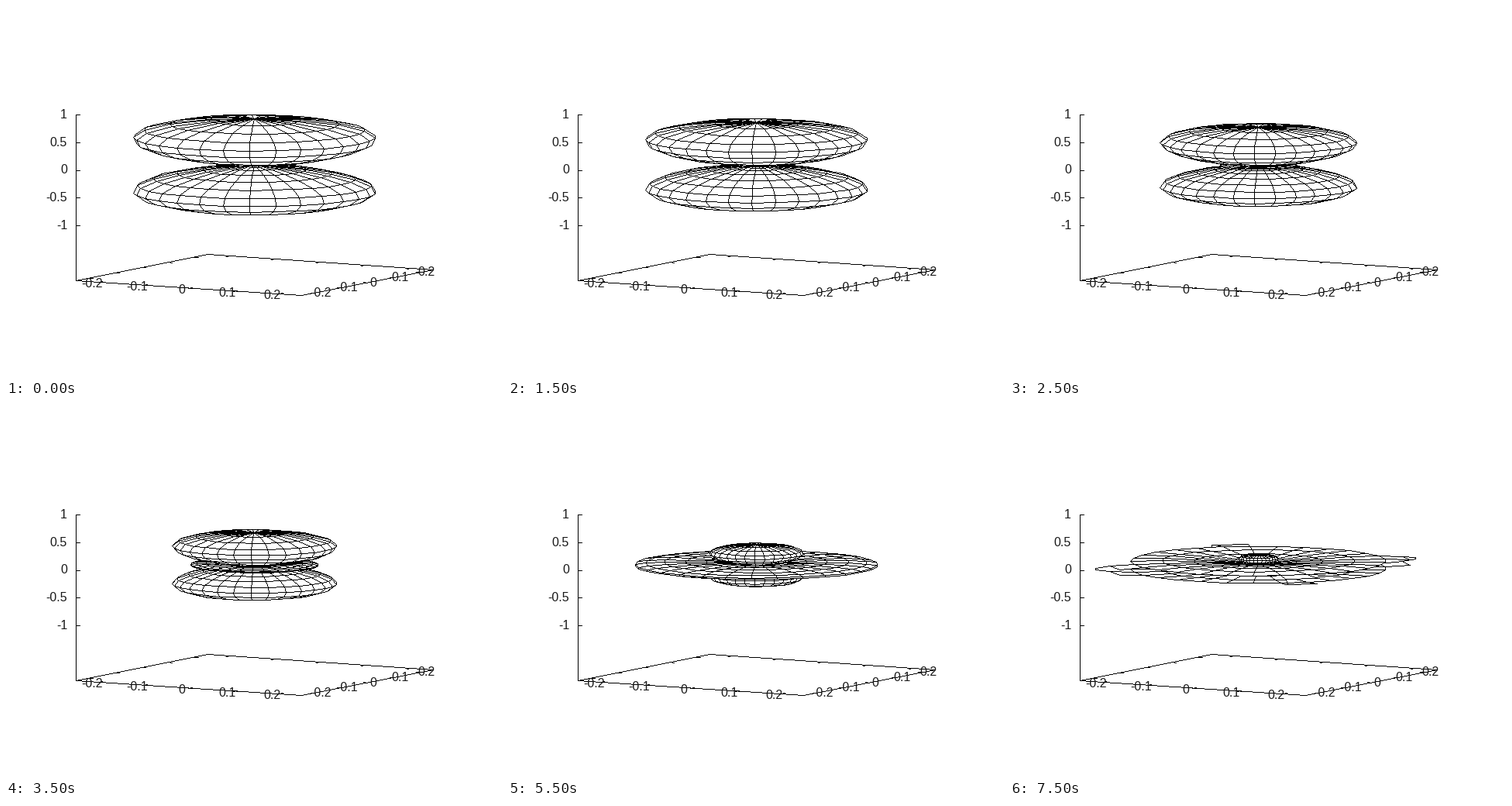
A matplotlib script that plays this animation: 640x480 px, repeating every 8000 ms.

```python
import numpy as np
import matplotlib.pyplot as plt
from matplotlib.animation import FuncAnimation

W, H, DPI = 640, 480, 100
FRAMES, STEP = 16, 500
SEG = 29                            # mesh cells along each angle
LIM = 0.25                          # x and y range is -LIM..LIM

CENTER = np.array([320.2, 204.5])
EX = np.array([582.0, 39.0])        # pixels per unit along x, y and z
EY = np.array([340.0, -67.0])
EZ = np.array([0.0, -71.2])


def project(x, y, z):
    x, y, z = (np.asarray(v, float)[..., None] for v in (x, y, z))
    return CENTER + x * EX + y * EY + z * EZ


# Superposition of the spherical harmonics Y00 and Y20
theta, azim = np.meshgrid(np.linspace(0, np.pi, SEG + 1),
                          np.linspace(0, 2 * np.pi, SEG + 1), indexing="ij")
Y00 = np.sqrt(1 / (4 * np.pi))
Y20 = np.sqrt(5 / (16 * np.pi)) * (3 * np.cos(theta) ** 2 - 1)


def surface(phase):
    r = Y00 ** 2 + Y20 ** 2 + 2 * Y00 * Y20 * np.cos(phase)
    rho = r * np.sin(theta)
    return rho * np.cos(azim), rho * np.sin(azim), r * np.cos(theta)


def corners(a):
    return np.stack([a[:-1, :-1], a[1:, :-1], a[1:, 1:], a[:-1, 1:]], axis=2)


def loose_edges(inside, whole):
    """Edges in range that belong to no complete cell."""
    found = []
    for i in range(SEG + 1):
        for j in range(SEG):
            if not inside[i, j]:
                continue
            near = [whole[k, j] for k in (i - 1, i) if 0 <= k < SEG]
            if inside[i, j + 1] and not any(near):
                found.append(((i, j), (i, j + 1)))
            if i < SEG and inside[i + 1, j] and not (whole[i, j] or whole[i, j - 1]):
                found.append(((i, j), (i + 1, j)))
    return found


def cells(phase):
    """Screen polygons of the mesh, farthest first."""
    x, y, z = surface(phase)
    pts = project(x, y, z)
    depth = 0.5 * x - 0.866 * y + 0.0125 * z
    inside = (abs(x) <= LIM) & (abs(y) <= LIM)
    whole = corners(inside).all(axis=2)

    quads = corners(pts)[whole]
    key = corners(depth).mean(axis=2)[whole]
    d1, d2 = quads[:, 2] - quads[:, 0], quads[:, 3] - quads[:, 1]
    front = d1[:, 0] * d2[:, 1] - d1[:, 1] * d2[:, 0] < 0

    edges = loose_edges(inside, whole)
    if edges:
        lines = np.array([[pts[a], pts[b], pts[b], pts[a]] for a, b in edges])
        quads = np.concatenate([quads, lines])
        key = np.append(key, [(depth[a] + depth[b]) / 2 for a, b in edges])
        front = np.append(front, np.ones(len(edges), bool))
    return np.rint(quads[np.lexsort((key, front))]).astype(int)


def draw_line(img, a, b):
    """One pixel wide line without smoothing."""
    (x0, y0), (x1, y1) = sorted([tuple(a), tuple(b)])
    n = max(abs(x1 - x0), abs(y1 - y0), 1)
    t = np.arange(n + 1) / n
    xs = np.floor(x0 + (x1 - x0) * t + 0.5).astype(int)
    ys = np.floor(y0 + (y1 - y0) * t + 0.5).astype(int)
    img[ys, xs] = 0


def draw_cell(img, quad):
    """White face with black edges."""
    (x0, y0), (x1, y1) = quad.min(axis=0), quad.max(axis=0)
    gx, gy = np.arange(x0, x1 + 1), np.arange(y0, y1 + 1)[:, None]
    ends = list(zip(quad.tolist(), np.roll(quad, -1, axis=0).tolist()))
    left = right = True
    for (ax_, ay), (bx, by) in ends:
        side = (bx - ax_) * (gy - ay) - (by - ay) * (gx - ax_)
        left, right = left & (side >= 0), right & (side <= 0)
    img[y0:y1 + 1, x0:x1 + 1][left | right] = 255
    for a, b in ends:
        draw_line(img, a, b)


fig = plt.figure(figsize=(W / DPI, H / DPI), dpi=DPI, facecolor="white")
ax = fig.add_axes([0, 0, 1, 1])
ax.set_xlim(0, W)
ax.set_ylim(H, 0)
ax.axis("off")


def label(value, x, y, ha="center"):
    ax.text(x + 0.5, y + 5.5, f"{value:g}", ha=ha, va="baseline",
            family="Liberation Sans", fontsize=16 * 72 / DPI, color="#1a1a1a")


def tick(start, way):
    way = np.asarray(way, float)
    return start, start + 5 * way / np.hypot(*way)


# Base, vertical axis, tick marks and their labels
base = project([-LIM, LIM, LIM, -LIM, -LIM], [-LIM, -LIM, LIM, LIM, -LIM], [-2] * 5)
segs = list(zip(base[:-1], base[1:]))
segs.append((base[0], project(-LIM, -LIM, 1)))
for v in (-0.2, -0.1, 0, 0.1, 0.2):
    px, py = project(v, -LIM, -2), project(LIM, v, -2)
    segs += [tick(px, EY), tick(project(v, LIM, -2), -EY),
             tick(py, -EX), tick(project(-LIM, v, -2), EX)]
    label(v, px[0] - 8.5, px[1] + 1.5)
    label(v, py[0] + 8, py[1] - 0.5)
for v in (1, 0.5, 0, -0.5, -1):
    pz = project(-LIM, -LIM, v)
    segs.append(tick(pz, (1, 0)))
    label(v, 78.5, pz[1] - 0.5, "right")

frame = np.full((H, W), 255, np.uint8)
for a, b in segs:
    draw_line(frame, np.rint(a).astype(int), np.rint(b).astype(int))

view = ax.imshow(frame, cmap="gray", vmin=0, vmax=255, extent=(0, W, H, 0),
                 interpolation="nearest", aspect="auto", zorder=0)


def update(n):
    img = frame.copy()
    for quad in cells(np.radians(9 * (n + 1))):
        draw_cell(img, quad)
    view.set_data(img)
    return [view]


anim = FuncAnimation(fig, update, frames=FRAMES, interval=STEP,
                     repeat=True, repeat_delay=0, blit=False)
plt.show()
```
